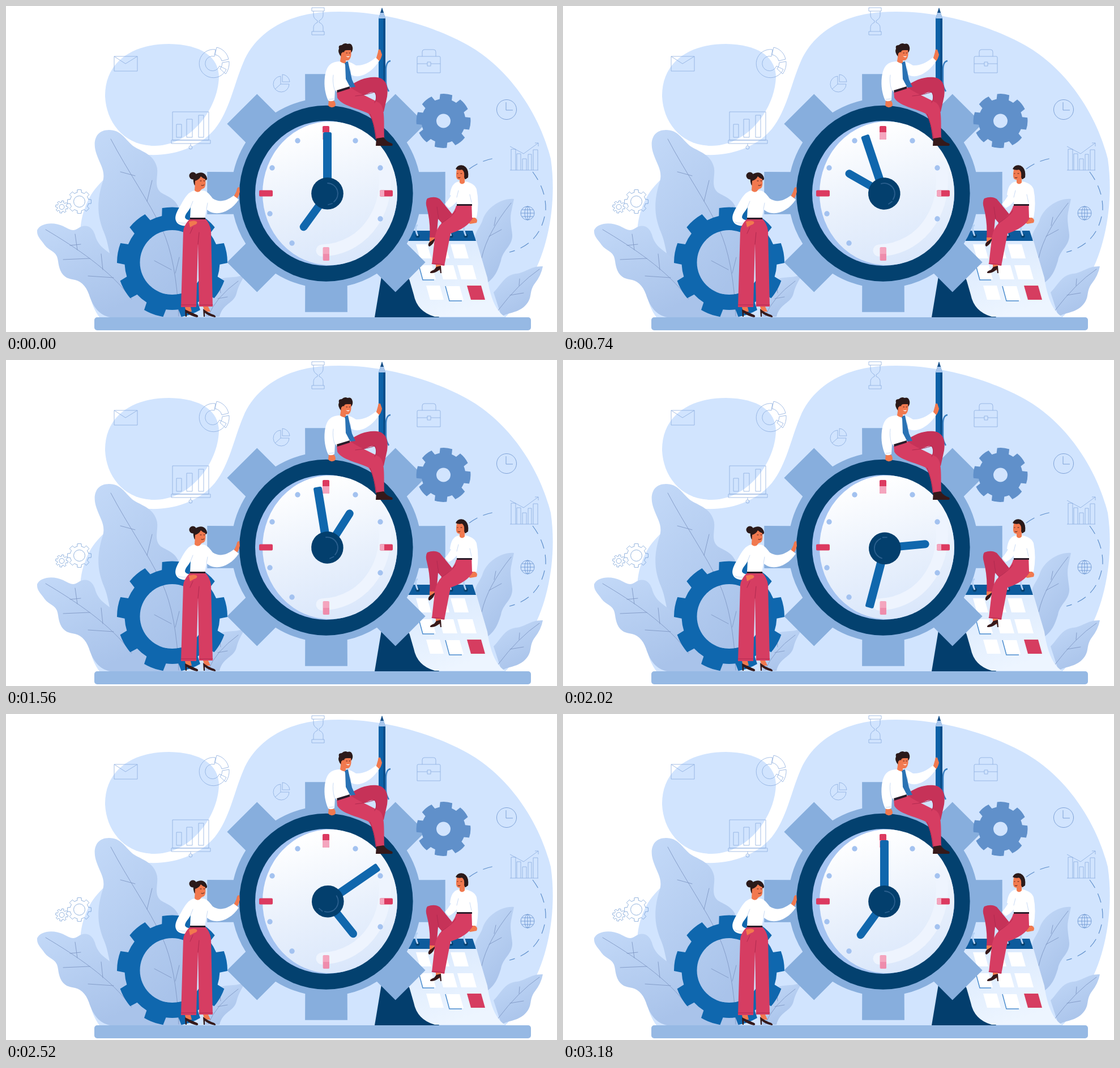
Animation, 973 px wide and 576 px high, one loop 3.2 s. Source, as an HTML page:

```html
<!DOCTYPE html>
<html lang="en">
<head>
<meta charset="utf-8">
<title>Time management</title>
<style>
html, body { margin: 0; width: 100%; height: 100%; overflow: hidden; background: #fff; }
svg { display: block; width: 973px; height: 576px; }
.icon { fill: none; stroke: #86a9dc; stroke-width: .75; }
.vein { fill: none; stroke: #8099c6; stroke-width: .9; stroke-linecap: round; }
.seam { fill: none; stroke: #b02a50; stroke-width: 1; stroke-linecap: round; }
.skin { fill: #f1794f; }
.hair { fill: #2b1a1a; }
.shoe { fill: #35191a; }
.shirt { fill: #fff; }
.fold { fill: none; stroke: #c9dbf5; stroke-width: 1; stroke-linecap: round; }
.pants { fill: #d63d62; }
.far { fill: #c63258; }
.face { fill: none; stroke: #4a1d1a; stroke-width: 1; stroke-linecap: round; }
</style>
</head>
<body>
<svg viewBox="0 0 973 576">
<defs>
  <linearGradient id="leaf" x1="0" y1="0" x2=".5" y2="1">
    <stop offset="0" stop-color="#c3d9f8"/><stop offset="1" stop-color="#a9c3ea"/>
  </linearGradient>
  <linearGradient id="dial" x1=".3" y1="0" x2=".55" y2="1">
    <stop offset=".05" stop-color="#fff"/><stop offset=".6" stop-color="#e8f0fc"/><stop offset="1" stop-color="#dae7fb"/>
  </linearGradient>
  <linearGradient id="page" x1="0" y1="0" x2=".4" y2="1">
    <stop offset="0" stop-color="#d8e8fd"/><stop offset="1" stop-color="#edf5ff"/>
  </linearGradient>
</defs>

<!-- backdrop -->
<g fill="#d1e4fe">
  <path d="M165 550C150 530 146 505 139 470C130 425 127 390 139 358C148 332 160 318 180 300L232 261C290 270 342 250 369 217C395 184 402 140 419 100C439 51 490 16 560 11C645 5 735 27 808 65C887 106 942 190 962 270C973 345 958 425 930 476C912 512 900 530 882 550Z"/>
  <path d="M175 160C174 100 222 67 288 67C345 68 376 90 376 126C374 182 326 247 262 247C208 247 177 205 175 160Z"/>
</g>

<!-- line icons -->
<g class="icon">
  <path d="M540 3h22v6h-22zM540 45h22v6h-22zM543 9v7q0 6 7 10v3q-7 3-7 9v7M560 9v7q0 6-7 10v3q7 3 7 9v7"/>
  <path d="M191 89h41v26h-41zM191 89l20 13 21-13"/>
  <path d="M370 77A25 25 0 1 0 389 112L377 106A13 13 0 1 1 368 89ZM372 73A27 27 0 0 1 393 94L381 97A15 15 0 0 0 369 86ZM394 98Q395 110 388 120L378 111Q382 106 382 100Z"/>
  <path d="M485 124A14 14 0 1 0 500 138H485ZM488 121A14 14 0 0 1 501 134H488ZM485 138l-10 9"/>
  <path d="M294 187h64v50h-64zM292 237h69v6h-69zM301 232v-23h9v23zM319 232v-32h10v32zM340 232v-39h9v39zM326 243v4"/>
  <circle cx="326" cy="250" r="3"/>
  <path d="M728 89h37q2 0 2 2v27h-41v-27q0-2 2-2zM735 89v-8q0-4 4-4h16q4 0 4 4v8M726 102h18M750 102h17M744 99h6v7h-6z"/>
  <g stroke="#648dca"><circle cx="884" cy="183" r="17.5"/><path d="M883 170v14h12"/></g>
  <path d="M890 290h50M892 290v-37h8v37M902 290v-29h7v29M912 290v-20h7v20M922 290v-28h6v28M931 290v-36h8v36M890 248l24 13 26-19M934 242h6v6"/>
  <g stroke="#5d8aca"><circle cx="921" cy="366" r="12"/><ellipse cx="921" cy="366" rx="5" ry="12"/><path d="M909 366h24M921 354v24M911 360h20M911 372h20"/></g>
  <g id="iconGears" stroke="#6d98d2"></g>
</g>
<g fill="none" stroke="#5d8ecb" stroke-width="1.2" stroke-dasharray="17 11">
  <path d="M818 288Q838 273 863 269"/>
  <path d="M930 293Q954 325 953 360Q946 420 889 435"/>
</g>

<!-- foliage -->
<g fill="url(#leaf)">
  <path d="M182 219C158 219 152 240 160 262C166 280 176 291 171 310C158 350 163 376 173 400C184 426 180 446 200 480L248 550H312C322 470 322 420 309 370C304 342 290 339 276 331C258 320 271 299 266 283C259 260 238 257 224 247C209 234 203 219 182 219Z"/>
  <path d="M55 396C61 383 84 381 101 389C113 395 118 399 127 393C140 384 152 389 157 404C163 426 176 430 192 444C220 463 240 500 253 550H184C164 546 155 532 148 514C142 494 132 485 117 483C98 480 94 465 92 451C90 432 77 434 68 422C61 412 54 407 55 396Z"/>
  <path d="M350 549C353 518 360 497 375 484C387 477 400 482 422 475C414 489 410 496 407 508C402 526 383 525 377 549Z"/>
  <path d="M897 341C874 339 849 357 842 377C836 396 823 399 829 430L849 490C866 477 869 465 874 450C877 431 895 424 894 404C892 386 889 375 893 360Q895 350 897 341Z"/>
  <path d="M948 460C926 459 917 472 900 473C880 476 874 493 861 506L875 549C886 541 906 543 919 527C930 514 923 505 934 490Q945 476 948 460Z"/>
</g>
<g class="vein">
  <path d="M185 235C215 292 252 344 276 395Q301 450 305 548M202 293L228 300M249 345L258 308M299 472L306 444M262 450L292 466"/>
  <path d="M70 395C122 426 185 467 222 518M113 423L132 421M101 448L148 446M126 431L122 403M145 477L190 480M171 466L168 438"/>
  <path d="M357 548Q370 515 410 486M374 517L391 514M379 507L378 497"/>
  <path d="M892 348Q850 400 840 445M862 388L865 373M853 407L875 395"/>
  <path d="M942 465Q905 490 868 539M906 494L907 482M890 511L914 507"/>
</g>

<!-- calendar -->
<path d="M663 478H708L765 550H651Z" fill="#033e6d"/>
<path d="M709 412H830L850 480Q858 535 881 549H757Q726 540 720 510L707 465Z" fill="url(#page)"/>
<path d="M707 397H824L830 415H711Z" fill="#0d5b9c"/>
<g fill="#04406f"><circle cx="727" cy="406" r="3.5"/><circle cx="786" cy="406" r="3.5"/><circle cx="812" cy="406" r="3.5"/></g>
<path d="M727 406q-7-17 0-19M786 406q-7-17 0-19M812 406q-7-17 0-19" fill="none" stroke="#b6d2f5" stroke-width="3"/>
<g id="cells"></g>

<!-- gears -->
<g id="gears"></g>

<!-- pencil -->
<path d="M658 22L664 3L670 22V170H658Z" fill="#0d62a7"/>
<path d="M658 22L661 12H667L670 22Z" fill="#a7c6ec"/>
<path d="M661 12L664 3L667 12Z" fill="#174f86"/>
<path d="M666 22h4v148h-4z" fill="#084e8b"/>
<path d="M679 97Q671 98 671 113V135Q671 143 676 151" fill="none" stroke="#397fc0" stroke-width="2.5"/>

<rect x="156" y="550" width="771" height="23" rx="5" fill="#96b9e4"/>

<!-- dial -->
<ellipse cx="565.3" cy="331.3" rx="153.3" ry="155.5" fill="#03416f"/>
<ellipse cx="565.5" cy="331" rx="125.5" ry="128" fill="#a4c3f1"/>
<ellipse cx="572" cy="331" rx="119" ry="127" fill="url(#dial)"/>
<path d="M667 285C680 350 640 429 558 432" fill="none" stroke="#eef4fe" stroke-width="21" stroke-linecap="round"/>
<g id="dots" fill="#a3c2f0"></g>
<g fill="#dc3a60">
  <rect x="559" y="212" width="12" height="24" rx="2"/>
  <rect x="447" y="325.5" width="24" height="11" rx="2"/>
  <rect x="660" y="325.5" width="23" height="11" rx="2"/>
</g>
<g fill="#f4a5be">
  <path d="M559 223h12v11q0 2-2 2h-8q-2 0-2-2zM668 325.5v11h-6q-2 0-2-2v-7q0-2 2-2z"/>
  <rect x="559.5" y="426" width="11.5" height="24" rx="2"/>
</g>
<path d="M560 438h11v10q0 2-2 2h-7q-2 0-2-2z" fill="#ee8cac"/>

<!-- hands -->
<g id="hour"><path d="M568 332V260" stroke="#1067ad" stroke-width="14" stroke-linecap="round"/></g>
<g id="minute">
  <rect x="560" y="223" width="15" height="110" rx="3" fill="#1067ad"/>
  <circle cx="567.5" cy="331.3" r="28.3" fill="#033f6d"/>
  <path d="M568 313A18.5 18.5 0 0 1 579 346M576 349Q573 350 569 351" fill="none" stroke="#2b5f8e" stroke-width="1.8" stroke-linecap="round"/>
</g>

<!-- seated man -->
<g>
  <path class="far" d="M604 144C620 130 640 124 655 126C671 128 676 142 673 160L667 187L648 184C653 170 655 158 651 153C643 149 630 162 617 160Z"/>
  <path class="pants" d="M584 150L607 143C620 153 645 163 659 171C670 179 667 205 668 233L653 235C650 210 646 197 640 190C622 181 592 176 585 162Z"/>
  <path class="seam" d="M617 159Q637 157 651 152Q657 160 651 171M654 234Q651 210 643 191"/>
  <path class="shoe" d="M654 234L667 232Q672 240 682 243Q684 246 681 247H653Z"/>
  <path class="skin" d="M570 166L580 168Q584 175 580 178Q573 181 569 176Z"/>
  <path class="skin" d="M653 95L657 81Q657 76 661 77L664 86Q662 95 658 98Z"/>
  <path class="shirt" d="M590 98C572 98 566 107 563 125C561 142 564 156 569 167Q575 170 580 166L581 148L584 152L611 143L609 121C623 130 645 119 659 97L653 91C642 100 630 106 618 105C610 100 605 98 600 97Z"/>
  <path class="fold" d="M580 148Q576 133 578 122M609 121L608 112M570 165l9-1"/>
  <path d="M584 149L607 142V146L585 153Z" fill="#281c2a"/>
  <path d="M597 99L604 98L605 103L611 130L617 143L608 144L600 129L599 104Z" fill="#2a72b4"/>
  <path class="hair" d="M592 90Q585 82 588 75Q586 69 593 69Q598 64 603 67Q609 65 611 70Q614 76 610 82Z"/>
  <path class="skin" d="M592 84Q595 80 597 82Q597 78 602 78H609Q611 90 606 95Q603 97 600 96V100Q596 103 590 98Z"/>
  <path class="face" d="M601 83h1.500M606 83h1.500"/>
  <path d="M600 88q4 2 7 0q-2 5-7 0" fill="#fff"/>
</g>

<!-- standing woman -->
<g>
  <path class="skin" d="M401 339L407 327Q408 319 412 320L413 328Q411 339 405 342Z"/>
  <path d="M314 373Q311 362 326 350L334 364L329 376Z" fill="#1067ad"/>
  <path class="shirt" d="M333 326C322 328 316 338 309 351C299 367 296 376 303 384Q311 391 327 387L328 379Q316 378 316 373C317 366 324 361 326 355L325 376H351L354 359C370 374 397 364 411 342L402 335C387 346 376 347 365 340C358 331 354 326 347 326Z"/>
  <path class="fold" d="M326 355L330 345M354 359L356 348M304 382Q311 385 326 383"/>
  <path class="pants" d="M325 376H352Q360 384 362 397L365 531H341L339 420L336 532H309L313 398Q314 387 325 376Z"/>
  <path class="seam" d="M339 421L341 400M330 391L325 402M309 528H336M341 528H365"/>
  <path d="M325 374h27v3h-27z" fill="#2d1e2b"/>
  <path class="skin" d="M323 381Q333 378 337 381Q339 385 332 387L325 391Z"/>
  <circle class="hair" cx="330" cy="300" r="6.5"/>
  <path class="hair" d="M333 317Q327 303 337 296Q349 291 354 301Q357 308 352 308Z"/>
  <path class="skin" d="M334 309Q341 307 344 301Q348 305 352 306Q354 322 347 323Q344 324 343 327Q338 331 333 326Z"/>
  <path class="face" d="M343 309h2M349 309h2M345 317q3 1 5-1"/>
  <path class="skin" d="M316 532h10l2 8h-10zM348 531h9l4 9h-10z"/>
  <path class="shoe" d="M316 536Q326 541 338 546Q341 549 337 550Q327 548 319 542V549H317ZM348 535Q356 542 368 546Q372 549 369 550Q358 548 351 542V549H349Z"/>
</g>

<!-- seated woman -->
<g>
  <path class="shirt" d="M792 322Q785 339 775 350L782 357Q796 350 803 333Z"/>
  <path class="skin" d="M818 374h10Q834 377 831 383L820 385L813 382Z"/>
  <path class="far" d="M797 354L789 369Q776 353 766 341Q757 335 744 340Q740 345 743 356Q750 383 748 410L760 412L763 376L776 391Q804 385 823 374V352Z"/>
  <path class="pants" d="M795 353Q791 369 770 383Q760 392 757 411L752 456L774 459L785 402Q815 392 824 375L823 352Z"/>
  <path class="seam" d="M764 376L761 355M769 384Q790 370 794 362M752 455L774 457"/>
  <path class="skin" d="M748 409h9l-2 9h-7zM759 457h9l-2 10h-7z"/>
  <path class="shoe" d="M757 411Q757 419 748 425Q744 424 747 418ZM768 459L769 472H767L766 465Q760 472 750 472Q746 470 756 466L760 461Z"/>
  <path class="shirt" d="M800 310Q786 312 784 334L796 338L796 353H823L822 343L823 374H831Q836 348 831 324Q828 314 812 310Z"/>
  <path class="fold" d="M822 347L819 333M796 338L799 326"/>
  <path d="M796 350h27v3h-27z" fill="#2d1e2b"/>
  <path class="hair" d="M797 285Q803 279 811 284Q817 289 816 302L812 306L801 304Z"/>
  <path class="skin" d="M796 288Q804 286 809 293L810 306V312Q805 317 801 312V307Q794 308 795 296Z"/>
  <path class="hair" d="M794 288Q798 279 808 282Q818 288 816 303Q812 306 809 303Q811 295 806 289Q799 291 794 288Z"/>
  <path class="face" d="M797 296h1M803 296h2M798 303q2 2 4 0"/>
</g>
</svg>
<script>
const $ = id => document.getElementById(id);

// Toothed wheel; hb and ht are half-widths in degrees at the root and the tip.
function gear({ x, y, n = 8, rot = 0, body, outer, hb, ht, hole = 0, flat, fill = '' }) {
  const at = (r, a) => {
    a *= Math.PI / 180;
    return `${(x + r * Math.sin(a)).toFixed(1)} ${(y - r * Math.cos(a)).toFixed(1)}`;
  };
  const tip = flat ? 1e4 : outer;
  let d = '';
  for (let i = 0; i < n; i++) {
    const a = rot + i * 360 / n;
    d += `${i ? `A${body} ${body} 0 0 1 ` : 'M'}${at(body, a - hb)}L${at(outer, a - ht)}`
      + `A${tip} ${tip} 0 0 1 ${at(outer, a + ht)}L${at(body, a + hb)}`;
  }
  d += `A${body} ${body} 0 0 1 ${at(body, rot - hb)}Z`;
  if (hole) d += `M${x - hole} ${y}a${hole} ${hole} 0 1 0 ${2 * hole} 0a${hole} ${hole} 0 1 0 ${-2 * hole} 0Z`;
  return `<path d="${d}" fill-rule="evenodd" ${fill && `fill="${fill}"`}/>`;
}

$('gears').innerHTML =
  gear({ x: 293.5, y: 453, n: 9, body: 84, outer: 97.5, hb: 12.5, ht: 10.5, hole: 57, fill: '#0f67ae' }) +
  gear({ x: 565.5, y: 330.5, body: 168, outer: 213.5, hb: 12.8, ht: 10.1, flat: true, fill: '#87aedd' }) +
  gear({ x: 772.5, y: 203, rot: 6, body: 39, outer: 48, hb: 16, ht: 13, hole: 12.5, fill: '#6090ca' });
$('iconGears').innerHTML =
  gear({ x: 129.5, y: 345.5, body: 16.5, outer: 21, hb: 13, ht: 10, hole: 10 }) +
  gear({ x: 98.5, y: 355, rot: 10, body: 8, outer: 11, hb: 14, ht: 9, hole: 4.5 });

$('dots').innerHTML = [[515, 238], [470, 286], [466, 367], [505, 419], [617, 238], [661, 286], [661, 376]]
  .map(([x, y]) => `<circle cx="${x}" cy="${y}" r="4.7"/>`).join('');

// Calendar days lean with the page; some carry a blue underline.
const cell = (x, y, w, fill, line) => `<path d="M${x} ${y}h${w}l7 25h${-w}z" fill="${fill}"/>` +
  (line ? `<path d="M${x} ${y}l7 26h${w - 3}" fill="none" stroke="#4c8dce" stroke-width="1.5"/>` : '');
$('cells').innerHTML = [
  [724, 421, 20], [754, 421, 22], [785, 421, 25],
  [729, 458, 23, 1], [765, 458, 25], [797, 458, 27],
  [742, 494, 24], [776, 495, 25, 1]
].map(([x, y, w, line]) => cell(x, y, w, '#fff', line)).join('') + cell(814, 494, 25, '#d63d60');

// Minute-hand keys: time in ms, angle in degrees.
const keys = [[0, 0], [780, 360], [1190, 540], [1580, 720], [1986, 900], [2400, 1080], [3180, 1440]];
function minuteAngle(t) {
  const i = Math.max(1, keys.findIndex(k => k[0] >= t));
  const [t0, a0] = keys[i - 1], [t1, a1] = keys[i];
  return a0 + (a1 - a0) * (t - t0) / (t1 - t0);
}

const turn = (id, a) => $(id).setAttribute('transform', `rotate(${a} 568 332)`);
const start = performance.now();
function draw() {
  const t = Math.floor(Math.max(0, performance.now() - start) % 3200 / 20) * 20;
  turn('hour', 216 + 360 * t / 3180);
  turn('minute', minuteAngle(t));
  requestAnimationFrame(draw);
}
draw();
</script>
</body>
</html>
```
